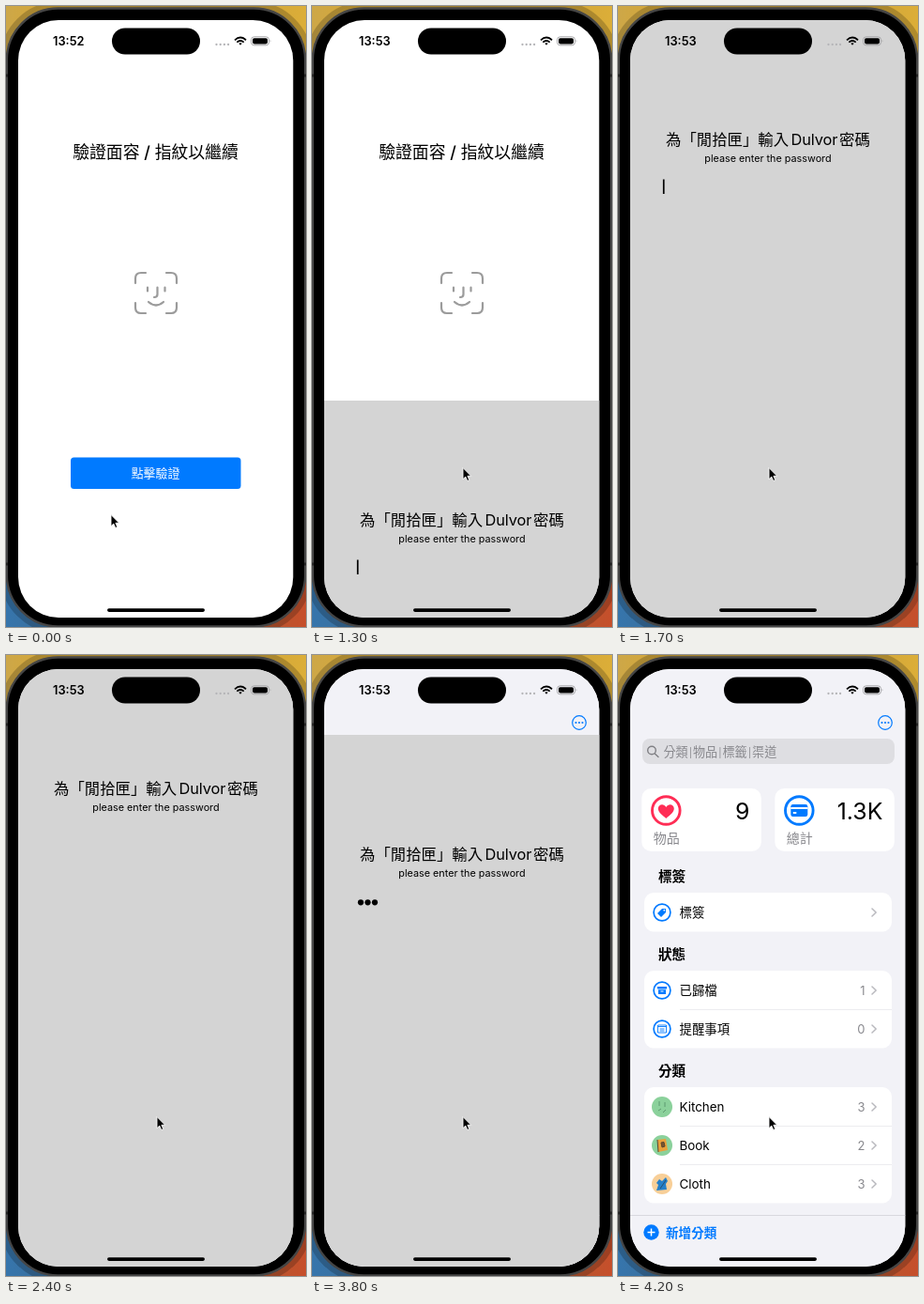
These frames come from a looping animation (320 by 661 pixels, 4.3 s). An HTML page:

```html
<!DOCTYPE html>
<html lang="zh-Hant">
<head>
<meta charset="utf-8">
<title>Unlock flow</title>
<style>
  html, body { margin: 0; width: 100%; height: 100%; overflow: hidden; background: #000; }
  svg { display: block; width: 320px; height: 661px; }
  text { font-family: Inter, "Noto Sans CJK TC", "Noto Sans CJK", sans-serif; }
  .grey { fill: #88888d; }
  .bar { font-size: 10px; letter-spacing: 1px; }
  .line { fill: none; stroke-linecap: round; stroke-linejoin: round; }
</style>
</head>
<body>
<svg viewBox="0 0 320 661">
  <defs>
    <linearGradient id="sky" x2="1">
      <stop stop-color="#cda748"/><stop offset=".15" stop-color="#d6a836"/>
      <stop offset=".6" stop-color="#c09a3c"/><stop offset="1" stop-color="#dcae38"/>
    </linearGradient>
    <linearGradient id="ground" x2="1">
      <stop stop-color="#3675ac"/><stop offset=".3" stop-color="#41698a"/>
      <stop offset=".8" stop-color="#b05a30"/><stop offset="1" stop-color="#c64f2b"/>
    </linearGradient>
    <clipPath id="screen"><rect x="13" y="15" width="293.3" height="636" rx="43"/></clipPath>
  </defs>

  <rect width="320" height="330" fill="url(#sky)"/>
  <rect y="330" width="320" height="331" fill="url(#ground)"/>
  <rect x=".8" y="2.5" width="318.4" height="658" rx="55" fill="none" stroke="#000" stroke-width="14" opacity=".2"/>
  <rect x=".8" y="2.5" width="318.4" height="658" rx="55" stroke="#454545" stroke-width="2.4"/>
  <path d="M0 74H2M318 74H320M0 594H2M318 594H320" stroke="#222" stroke-width="3"/>

  <g clip-path="url(#screen)">
    <rect x="13" y="15" width="294" height="637" fill="#fff"/>

    <g id="lock">
      <text x="159.5" y="162" font-size="17.85" text-anchor="middle" font-weight="500">驗證面容 / 指紋以繼續</text>
      <path class="line" stroke="#9b9b9b" stroke-width="2.2" d="M138 295V290Q138 284 144 284H149M171 284H176Q182 284 182 290V295M182 316V321Q182 327 176 327H171M149 327H144Q138 327 138 321V316M151 299.5V303.5M169.5 299.5V303.5M161.5 299.5V307Q161.5 310 158 310M152 315Q160 322 168 315"/>
      <g id="button">
        <rect x="69" y="480.5" width="181.5" height="33.5" rx="3.5" fill="#007aff"/>
        <text x="159.5" y="502" font-size="12.9" text-anchor="middle" fill="#fff">點擊驗證</text>
      </g>
    </g>

    <g id="home">
      <rect x="13" y="15" width="294" height="637" fill="#f2f2f7"/>
      <g fill="#007aff">
        <circle cx="285" cy="72" r="7.3" fill="none" stroke="#007aff" stroke-width="1.2"/>
        <circle cx="281.5" cy="72" r="1.1"/><circle cx="285" cy="72" r="1.1"/><circle cx="288.5" cy="72" r="1.1"/>
      </g>
      <rect x="26" y="89" width="269" height="27" rx="8" fill="#dedee2"/>
      <g class="line" stroke="#808085" stroke-width="1.4"><circle cx="36" cy="101.5" r="4.3"/><path d="M39.3 105L43 108.5"/></g>
      <text id="search" class="grey" x="48.5" y="107.5" font-size="13.1"></text>
      <g id="cards"></g>
    </g>

    <g id="sheet">
      <rect x="13" y="15" width="294" height="637" fill="#d4d4d4"/>
      <g font-size="16.4">
        <text x="51" y="148">為「閒拾匣」輸入</text>
        <text x="184.5" y="148" letter-spacing="-.1">Dulvor</text>
        <text x="236" y="148">密碼</text>
      </g>
      <text x="160" y="165.5" font-size="10.8" text-anchor="middle">please enter the password</text>
      <g id="dots"></g>
      <rect id="caret" y="184.5" width="1.7" height="15.5"/>
    </g>

    <text id="clock" x="50" y="42" font-size="12.8" font-weight="600"></text>
    <rect x="113" y="23.5" width="94" height="28" rx="14"/>
    <path d="M224.5 41H238.5" class="line" stroke="#b5b5b8" stroke-width="2.3" stroke-dasharray="0 4.2"/>
    <g fill="none" stroke="#000" stroke-width="1.8">
      <path d="M244 36.3Q250 30.8 256 36.3M246.3 38.6Q250 35.3 253.7 38.6"/>
      <path d="M248.3 39.8Q250 38.5 251.7 39.8L250 41.7Z" fill="#000" stroke="none"/>
    </g>
    <rect x="261.6" y="32.8" width="18.8" height="9" rx="3" fill="none" stroke="#a5a5a8"/>
    <rect x="263" y="34.2" width="16" height="6.2" rx="1.8"/>
    <path d="M281.7 35.8Q283.3 37.3 281.7 38.8" fill="#a5a5a8"/>
    <rect x="108" y="641.3" width="104" height="3.6" rx="1.8"/>
  </g>

  <path id="cursor" d="M0 0V12.2L2.8 9.6L4.7 14L6.8 13.1L4.9 8.8H8.7Z" stroke="#fff" stroke-width=".9"/>
</svg>
<script>
const $ = id => document.getElementById(id);
const BLUE = '#007aff', RED = '#ff2d55';
const panel = (x, y, w, h) => `<rect x="${x}" y="${y}" width="${w}" height="${h}" rx="10" fill="#fff"/>`;
const label = (x, y, size, s, more = '') => `<text x="${x}" y="${y}" font-size="${size}" ${more}>${s}</text>`;
const ring = (x, y, r, w, color) => `<circle cx="${x}" cy="${y}" r="${r}" fill="none" stroke="${color}" stroke-width="${w}"/>`;
const shape = (x, y, d, color, more = '') => `<path transform="translate(${x} ${y})" d="${d}" fill="${color}" ${more}/>`;
const disc = (y, color) => `<circle cx="47" cy="${y}" r="11" fill="${color}"/>`;
const ringed = (y, d, color = BLUE, more = '') => ring(47, y, 8.9, 1.7, BLUE) + shape(47, y, d, color, more);

const icons = {
  tag: y => ringed(y, 'M-5 1L0 -4H4V0L-1 5Z') + `<circle cx="49.3" cy="${y - 2.3}" r=".9" fill="#fff"/>`,
  box: y => ringed(y, 'M-5 -4H5V-1.5H-5ZM-4 -.7H4V4H-4Z') + shape(47, y, 'M-1.5 1H1.5', 'none', 'stroke="#fff"'),
  note: y => ringed(y, 'M-4.5 -4H4.5V4H-4.5ZM-4.5 -2.5H4.5M-2.5 0H2.5M-2.5 2H2.5', 'none', `stroke="${BLUE}" stroke-width=".9"`),
  kitchen: y => disc(y, '#8bd19b') +
    shape(47, y, 'M-3 -6V-1M3 -5V0M-4 4L-1 2M1 6L4 3', 'none', 'stroke="#5d9a70"'),
  book: y => disc(y, '#8bd19b') + shape(47, y, 'M-5 -6L4 -7L6 5L-4 7Z', '#e9a13b') +
    shape(47, y, 'M-5 -6L-4 7M-1 -3L2 -3.5L3 1L0 2Z', '#7b5630', 'stroke="#5b4630"'),
  cloth: y => disc(y, '#f8cf98') + shape(47, y, 'M-3 -5L0 -3L4 -7L6 -3L4 0L5 6L-6 7L-4 1L-6 -1Z', '#2680c9') +
    shape(47, y, 'M-2 5L4 -4', 'none', 'stroke="#27506f"')
};

function section(title, y, rows) {
  let out = label(43, y + 6, 14.6, title, 'font-weight="700"') + panel(28, y + 18, 264, 41 * rows.length + .5);
  rows.forEach(([icon, name, count], i) => {
    const cy = y + 39 + 41 * i;
    if (i) out += `<path d="M66 ${cy - 20.5}H292" stroke="#e4e4e8" stroke-width=".7"/>`;
    out += icons[icon](cy) + label(65.5, cy + 4.8, 13.4, name) +
      label(263.5, cy + 4.6, 13, count, 'class="grey" text-anchor="end"') +
      shape(271, cy, 'M0 -4L4.2 0L0 4', 'none', 'stroke="#b9b9be" stroke-width="1.5" class="line"');
  });
  return out;
}

const summary = (x, name, value, color, icon) =>
  panel(x, 142, 127.5, 67) + ring(x + 26, 165.5, 14.8, 2.9, color) + icon +
  label(x + 115, 174.5, 24.8, value, 'text-anchor="end"') + label(x + 12.5, 200, 14, name, 'class="grey"');

$('search').innerHTML = ['分類', '物品', '標籤', '渠道'].join('<tspan class="bar" dx="1">|</tspan>');

$('cards').innerHTML =
  summary(25.3, '物品', '9', RED, shape(51.3, 166, 'M0 8C-3 5 -8.5 2 -8.5 -2.5C-8.5 -7 -2.5 -8.5 0 -4C2.5 -8.5 8.5 -7 8.5 -2.5C8.5 2 3 5 0 8Z', RED)) +
  summary(167.3, '總計', '1.3K', BLUE,
    `<rect x="184.3" y="159" width="18" height="13" rx="2.3" fill="${BLUE}"/>` +
    shape(193.3, 165.5, 'M-9 -2.5H9M-6.5 2.5H-3', 'none', 'stroke="#fff" stroke-width="1.8"')) +
  section('標簽', 235, [['tag', '標簽', '']]) +
  section('狀態', 318, [['box', '已歸檔', 1], ['note', '提醒事項', 0]]) +
  section('分類', 442, [['kitchen', 'Kitchen', 3], ['book', 'Book', 2], ['cloth', 'Cloth', 3]]) +
  '<path d="M13 596.5H307" stroke="#d2d2d8" stroke-width=".8"/>' +
  `<circle cx="35.5" cy="614.5" r="8.2" fill="${BLUE}"/>` +
  shape(35.5, 614.5, 'M-4 0H4M0 -4V4', 'none', 'stroke="#fff" stroke-width="1.5"') +
  label(51, 619.5, 13.6, '新增分類', `fill="${BLUE}" font-weight="700"`);

$('dots').innerHTML = [52, 59.5, 67].map(x => `<circle cx="${x}" cy="193.3" r="3.1"/>`).join('');

const LOOP = 4300, STEP = 100, TRAVEL = 646;
const clamp = v => Math.min(1, Math.max(0, v));
const smooth = u => u * u * (3 - 2 * u);
// Remaining share of a critically damped spring
const spring = x => x <= 0 ? 1 : (1 + x) * Math.exp(-x);

function caretAlpha(t) {
  if (t < 2500) return clamp(1 - (t - 2100) / 300);
  if (t < 3500) return clamp((t - 2500) / 200);
  return clamp(1 - (t - 3500) / 200);
}

function draw(t) {
  const glide = smooth(clamp((t - 100) / 400));
  $('cursor').setAttribute('transform', `translate(${112 + 49 * glide} ${541.5 - 50 * glide})`);
  $('button').setAttribute('opacity', t < 800 ? 1 : clamp(.4 + (t - 800) / 500));
  $('clock').textContent = t < 1000 ? '13:52' : '13:53';
  $('home').style.display = t < 3000 ? 'none' : '';

  const offset = TRAVEL * (t < 3000 ? spring((t - 1235) * .02) : 1 - spring((t - 3757) * .013));
  $('sheet').setAttribute('transform', `translate(0 ${Math.round(offset - .2)})`);
  $('sheet').style.display = t < 1235 || t >= 4200 ? 'none' : '';

  const typed = [2800, 2900, 3100].filter(k => t >= k).length;
  [...$('dots').children].forEach((dot, i) => dot.style.display = i < typed ? '' : 'none');
  $('caret').setAttribute('x', typed ? 47.7 + 7.5 * typed : 47.9);
  $('caret').setAttribute('opacity', caretAlpha(t));
}

const start = performance.now();
function tick(now) {
  const t = Math.max(0, now - start) % LOOP;
  draw(Math.floor(t / STEP) * STEP);
  requestAnimationFrame(tick);
}
draw(0);
requestAnimationFrame(tick);
</script>
</body>
</html>
```
